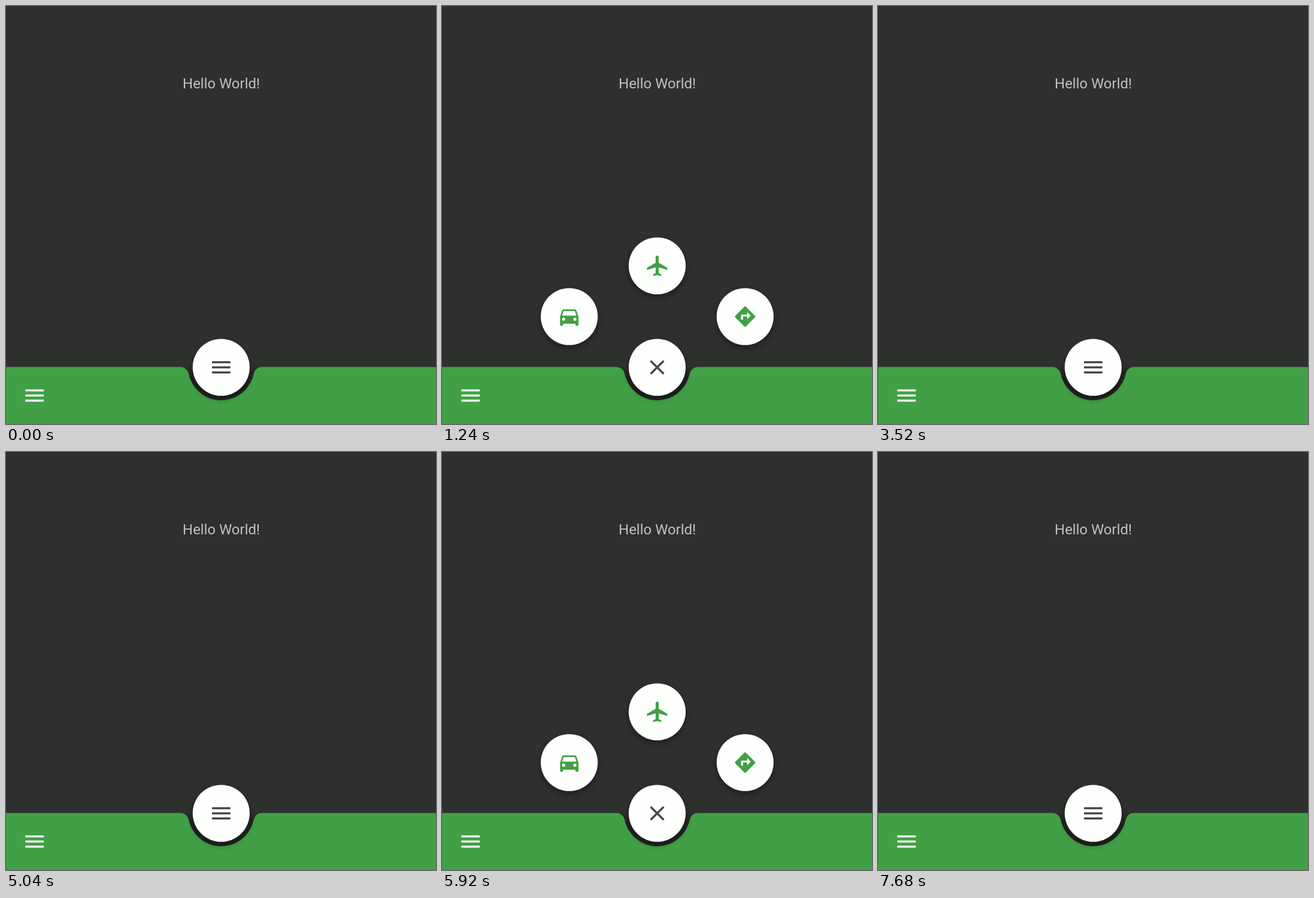
An HTML page with a canvas that plays this animation: 720x700 px, repeating every 8 s.

```html
<!DOCTYPE html>
<html lang="en">
<head>
<meta charset="utf-8">
<title>Radial menu</title>
<style>
  html, body { margin: 0; width: 100%; height: 100%; overflow: hidden; background: #2e302e; }
  canvas { position: absolute; left: 0; top: 0; }
  p {
    position: absolute; left: 0; top: 116px; width: 721px; margin: 0;
    font: 24px/28px Roboto, sans-serif; text-align: center; color: #c0c1c0;
  }
</style>
</head>
<body>
<canvas id="stage" width="720" height="700"></canvas>
<p>Hello World!</p>
<script>
const ctx = document.getElementById('stage').getContext('2d');
const LOOP = 8000;
const BG = '#2e302e', GREEN = '#41a045', WHITE = '#fdfffd', DARK = '#444544';
const CX = 360.3, CY = 605.1, RADIUS = 47.7;
const DP = 96 / 56;
const REACH = 170;

const car = new Path2D('M18.92 6.01C18.72 5.42 18.16 5 17.5 5h-11c-.66 0-1.21.42-1.42 1.01L3 12v8c0 .55.45 1 1 1h1c.55 0 1-.45 1-1v-1h12v1c0 .55.45 1 1 1h1c.55 0 1-.45 1-1v-8zM6.5 16a1.5 1.5 0 1 1 0-3a1.5 1.5 0 1 1 0 3zM17.5 16a1.5 1.5 0 1 1 0-3a1.5 1.5 0 1 1 0 3zM5 11l1.5-4.5h11L19 11z');
const plane = new Path2D('M22 16v-2l-8.5-5V3.5a1.5 1.5 0 0 0-3 0V9L2 14v2l8.5-2.5V19L8 20.5V22l4-1 4 1v-1.5L13.5 19v-5.5z');
const turn = new Path2D('M21.71 11.29l-9-9a1 1 0 0 0-1.41 0l-9 9a1 1 0 0 0 0 1.41l9 9a1 1 0 0 0 1.41 0l9-9a1 1 0 0 0 0-1.41zM14 14.5V12h-4v3H8v-4c0-.55.45-1 1-1h5V7.5l3.5 3.5z');

const items = [
  { icon: car, angle: 150 },
  { icon: plane, angle: 90 },
  { icon: turn, angle: 30 }
];

// Each cycle: opening and closing start times with the closing length
const OPEN_MS = 300;
const cycles = [
  { open: 553, close: 3010, closeMs: 210 },
  { open: 5116, close: 7300, closeMs: 210 }
];
const presses = [
  { from: 480, to: 800 },
  { from: 5040, to: 5130 },
  { from: 2920, to: 3180 }
];

const clamp = v => Math.min(1, Math.max(0, v));
const ramp = (t, start, ms) => clamp((t - start) / ms);

// Cubic curve (0.4, 0, 0.2, 1)
function ease(x) {
  if (x <= 0 || x >= 1) return clamp(x);
  let lo = 0, hi = 1, s = 0.5;
  for (let i = 0; i < 24; i++) {
    s = (lo + hi) / 2;
    const q = 1 - s;
    if (1.2 * q * q * s + 0.6 * q * s * s + s * s * s < x) lo = s; else hi = s;
  }
  return s * s * (3 - 2 * s);
}

function pose(t) {
  let spread = 0, glyph = 0, lift = 0, press = 0;
  for (const c of cycles) {
    if (t < c.open) continue;
    const opening = ramp(t, c.open, OPEN_MS);
    const closing = ramp(t, c.close, c.closeMs);
    spread = ease(opening) * (1 - ease(closing));
    glyph = opening * (1 - closing);
    lift = ramp(t, c.open + OPEN_MS, 120) * (1 - ramp(t, c.close, 80));
  }
  for (const p of presses) {
    press = Math.max(press, ramp(t, p.from, 100) * (1 - ramp(t, p.to, 150)));
  }
  return { spread, glyph, lift, press };
}

function disc(x, y, shade, blur, drop) {
  ctx.save();
  ctx.shadowColor = `rgba(0,0,0,${shade})`;
  ctx.shadowBlur = blur;
  ctx.shadowOffsetY = drop;
  ctx.fillStyle = WHITE;
  ctx.beginPath();
  ctx.arc(x, y, RADIUS, 0, 7);
  ctx.fill();
  ctx.restore();
}

function line(y, angle) {
  ctx.save();
  ctx.rotate(angle);
  ctx.fillRect(-9, y - 1, 18, 2);
  ctx.restore();
}

function menu(x, y, color, k) {
  const gap = 5 * (1 - ease(k * 2));
  const tilt = ease(k * 2 - 1) * Math.PI / 4;
  ctx.save();
  ctx.translate(x, y);
  ctx.scale(DP, DP);
  ctx.fillStyle = color;
  line(-gap, tilt);
  line(gap, -tilt);
  if (k < 0.5) line(0, 0);
  ctx.restore();
}

function bar() {
  const top = 604.6, notch = 55.6, corner = 8 * DP;
  const reach = Math.sqrt((notch + corner) ** 2 - corner ** 2);
  const a = Math.atan2(corner, reach);
  const fade = ctx.createLinearGradient(0, top - 2, 0, top + 16);
  fade.addColorStop(0, BG);
  fade.addColorStop(1, '#222422');
  ctx.fillStyle = fade;
  ctx.fillRect(CX - 75, top, 150, 62);

  ctx.fillStyle = GREEN;
  ctx.beginPath();
  ctx.moveTo(0, top);
  ctx.arc(CX - reach, top + corner, corner, -Math.PI / 2, -a);
  ctx.arc(CX, top, notch, Math.PI - a, a, true);
  ctx.arc(CX + reach, top + corner, corner, Math.PI + a, -Math.PI / 2);
  ctx.lineTo(720, top);
  ctx.lineTo(720, 700);
  ctx.lineTo(0, 700);
  ctx.fill();
}

function draw(t) {
  const { spread, glyph, lift, press } = pose(t);
  ctx.fillStyle = BG;
  ctx.fillRect(0, 0, 720, 700);
  bar();
  menu(47.8, 652.3, WHITE, 0);

  if (spread > 0) {
    for (const { icon, angle } of items) {
      const a = angle * Math.PI / 180;
      const x = CX + Math.cos(a) * REACH * spread;
      const y = CY - Math.sin(a) * REACH * spread;
      disc(x, y, 0.38 * lift, 11, 5);
      ctx.save();
      ctx.translate(x - 12 * DP, y - 12 * DP);
      ctx.scale(DP, DP);
      ctx.fillStyle = GREEN;
      ctx.fill(icon, 'evenodd');
      ctx.restore();
    }
  }

  disc(CX, CY, 0.36 + 0.06 * press, 11 + 7 * press, 5 + 3 * press);
  menu(CX, CY, DARK, glyph);
}

const begin = performance.now();
function frame(now) {
  draw(Math.max(0, now - begin) % LOOP);
  requestAnimationFrame(frame);
}
draw(0);
requestAnimationFrame(frame);
</script>
</body>
</html>
```
